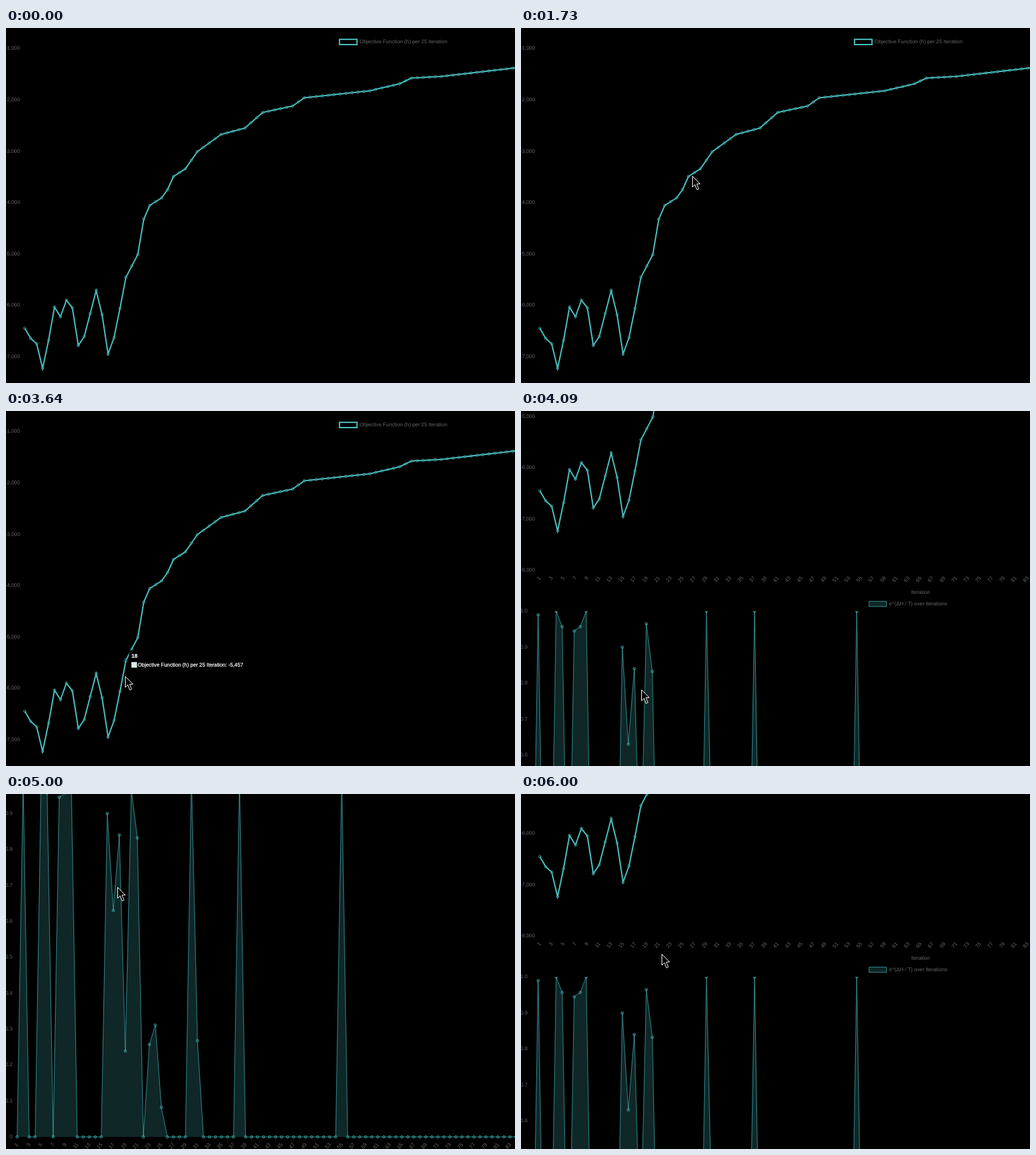
Animation, 800 px wide and 557 px high, one loop 6.09 s. Source, as an HTML page with a canvas:

```html
<!DOCTYPE html>
<html lang="en">
<head>
<meta charset="utf-8">
<title>Objective function charts</title>
<style>
  html, body { margin: 0; height: 100%; overflow: hidden; background: #000; }
  canvas { display: block; }
</style>
</head>
<body>
<canvas id="stage" width="800" height="557"></canvas>
<script>
const ctx = document.getElementById('stage').getContext('2d');
const LOOP = 6090, FRAMES = 67, COUNT = 84;
const U = 0.686;                    // page zoom: one chart unit in stage pixels
const FONT = 12 * U + 'px "Liberation Sans", Arial, sans-serif';
const TEAL = 'rgb(75,192,192)', GREY = '#666';

const clamp = v => Math.max(0, Math.min(1, v));
const range = (n, fn) => Array.from({length: n}, (_, i) => fn(i));

// Linear interpolation over keys of the form [position, ...values]
function at(keys, pos) {
  const next = keys.findIndex(k => k[0] > pos);
  if (next === 0) return keys[0].slice(1);
  if (next < 0) return keys[keys.length - 1].slice(1);
  const a = keys[next - 1], b = keys[next], p = (pos - a[0]) / (b[0] - a[0]);
  return a.slice(1).map((v, i) => v + (b[i + 1] - v) * p);
}

// Objective curve in page pixels: an erratic start, then a climb through a few knees
const erratic = [471, 487, 495.5, 534, 490, 438, 453, 427, 439, 498, 484, 448, 412, 450, 511.5, 486, 440];
const climb = [
  [18, 391.23], [20, 355.5], [21, 300], [22, 278.5], [24, 266.5], [25, 253.5],
  [26, 233], [28, 220.93], [30, 194], [34, 167], [38, 157], [41, 132.5],
  [46, 122.5], [48, 109.5], [59, 98.5], [64, 87.5], [66, 78.5], [71, 76], [84, 62]];
const objectiveY = n => n <= erratic.length ? erratic[n - 1] : at(climb, n)[0];

// Acceptance is zero except for these runs, keyed by their first iteration
const runs = {
  2: [.99], 5: [1, .957], 8: [.945, .957, 1], 16: [.9, .63, .84, .239, .965, .832],
  23: [.257, .311, .082], 30: [1, .268], 38: [1], 55: [1]};
const acceptance = Array(COUNT + 1).fill(0);
for (const first in runs) runs[first].forEach((v, i) => acceptance[+first + i] = v);

const charts = [
  {
    label: 'Objective Function (h) per 25 Iteration',
    points: range(COUNT, i => [29.5 + 9.35 * i, objectiveY(i + 1)]),
    width: 3, fill: 'rgba(0,0,0,0.1)', top: 0, base: 596, filled: false,
    legend: [524.2, 21.9], tickRight: 22,
    ticks: range(8, k => [`-${k + 1},000`, 32.2 + 80.55 * k]),
    value: y => '-' + Math.round(1000 + (y - 32.2) / 0.08055).toLocaleString('en-US')
  },
  {
    label: 'e^(ΔH / T) over Iterations',
    points: range(COUNT, i => [17.5 + 9.447 * i, 1224 - 563.9 * acceptance[i + 1]]),
    width: 1, fill: 'rgba(75,192,192,0.2)', top: 659.7, base: 1224, filled: true,
    legend: [547, 648.8], tickRight: 10.4,
    ticks: range(11, k => [k ? (k / 10).toFixed(1) : '0', 1224 - 56.39 * k]),
    value: y => ((1224 - y) / 563.9).toFixed(2)
  }
];

// Turning points of the pointer and the page: [step, ...position]
const cursorKeys = [
  [2, 394, 500], [7, 171, 430], [10, 174, 442], [12, 175, 441], [16, 212, 320],
  [19, 269, 232], [20, 254, 253], [22, 200, 403], [23, 200, 403], [27, 281, 222],
  [29, 205, 382], [30, 181, 422], [38, 188, 393], [40, 187, 416], [45, 189, 437],
  [48, 190, 437], [53, 178, 77], [55, 175, 146], [57, 168, 181], [62, 174, 178],
  [66, 221, 251]];
const scrollKeys = [[41, 0], [45, 346], [47, 686], [62, 686], [66, 373]];

// Tooltips: chart, iteration, start and end of hover in ms
const hovers = [
  [0, 17, 1070, 1250], [0, 25, 1740, 1810], [0, 28, 2420, 2625],
  [0, 18, 3430, 3640], [1, 17, 5150, 5680]];

function text(str, x, y, align = 'left', color = GREY, weight = '') {
  ctx.font = weight + ' ' + FONT;
  ctx.textRendering = 'geometricPrecision';
  ctx.textAlign = align;
  ctx.textBaseline = 'middle';
  ctx.fillStyle = color;
  ctx.fillText(str, x, y);
}

// White text on black gets a hairline so that it stays as dense as zoomed-out text
function brightText(str, x, y, weight) {
  text(str, x, y, 'left', '#fff', weight);
  ctx.strokeStyle = '#fff';
  ctx.lineWidth = 0.25;
  ctx.strokeText(str, x, y);
}

function trace(points) {
  ctx.beginPath();
  points.forEach(([x, y]) => ctx.lineTo(x, y));
}

function dot([x, y], radius, fill) {
  ctx.beginPath();
  ctx.arc(x, y, radius * U, 0, 7);
  ctx.fillStyle = fill;
  ctx.fill();
  ctx.lineWidth = U;
  ctx.stroke();
}

function drawChart(chart, hovered) {
  const {points, base} = chart, [lx, ly] = chart.legend;
  ctx.strokeStyle = TEAL;
  ctx.fillStyle = chart.fill;
  ctx.lineWidth = chart.width * U;
  ctx.fillRect(lx, ly - 6 * U, 40 * U, 12 * U);
  ctx.strokeRect(lx, ly - 6 * U, 40 * U, 12 * U);
  text(chart.label, lx + 46 * U, ly - 0.4);

  chart.ticks.forEach(([label, y]) => text(label, chart.tickRight, y, 'right'));
  for (let i = 0; i < COUNT; i += 2) {
    ctx.save();
    ctx.translate(points[i][0] + 0.5, base + 10.8);
    ctx.rotate(-50 * Math.PI / 180);
    text(i + 1, 0, 0, 'right');
    ctx.restore();
  }

  ctx.save();
  ctx.beginPath();
  ctx.rect(0, chart.top, 800, 1300);
  ctx.clip();
  if (chart.filled) {
    trace([[points[0][0], base], ...points, [points[COUNT - 1][0], base]]);
    ctx.fillStyle = chart.fill;
    ctx.fill();
  }
  trace(points);
  ctx.lineWidth = chart.width * U;
  ctx.stroke();
  points.forEach((p, i) => dot(p, 3 + (hovered[i + 1] || 0), chart.fill));
  ctx.restore();
}

function drawTooltip(chart, iteration, alpha) {
  const [px, py] = chart.points[iteration - 1];
  const body = `${chart.label}: ${chart.value(py)}`;
  const height = 46.8 * U, left = px + 7 * U, top = py - height / 2;
  const x = left + 6 * U, bodyY = top + 33.6 * U, box = 12 * U;
  ctx.save();
  ctx.globalAlpha = alpha;
  ctx.font = FONT;
  ctx.fillStyle = 'rgba(0,0,0,0.8)';
  ctx.beginPath();
  ctx.roundRect(left, top, ctx.measureText(body).width + 26 * U, height, 6 * U);
  ctx.moveTo(left, py - 5 * U);
  ctx.lineTo(px + 2 * U, py);
  ctx.lineTo(left, py + 5 * U);
  ctx.fill();
  ctx.strokeStyle = TEAL;
  ctx.lineWidth = U;
  ctx.strokeRect(x, bodyY - box / 2, box, box);
  ctx.fillStyle = '#fff';
  ctx.fillRect(x, bodyY - box / 2, box, box);
  ctx.fillStyle = chart.fill;
  ctx.fillRect(x + U, bodyY - box / 2 + U, box - 2 * U, box - 2 * U);
  brightText(iteration, x, top + 13.2 * U, 'bold');
  brightText(body, x + 14 * U, bodyY, '');
  ctx.restore();
}

function drawCursor([x, y]) {
  ctx.save();
  ctx.translate(Math.round(x) + 0.5, Math.round(y) + 0.5);
  trace([[0, 0], [0, 17], [4, 13.3], [7, 21.3], [10, 20], [6.8, 12.3], [12, 12.1]]);
  ctx.closePath();
  ctx.fillStyle = '#000';
  ctx.fill();
  ctx.strokeStyle = '#fff';
  ctx.lineWidth = 1;
  ctx.stroke();
  ctx.restore();
}

function draw(ms) {
  // The picture advances in steps of about 91 ms
  const step = Math.floor(ms / LOOP * FRAMES + 0.1) % FRAMES;
  const t = step * LOOP / FRAMES;
  const active = hovers
    .map(([c, i, on, off]) => [c, i, Math.min(clamp((t - on) / 200), clamp(1 - (t - off) / 200))])
    .filter(h => h[2] > 0);

  ctx.fillStyle = '#000';
  ctx.fillRect(0, 0, 800, 557);
  ctx.save();
  ctx.translate(0, -Math.round(at(scrollKeys, step)[0]));
  charts.forEach((chart, c) => {
    const hovered = {};
    active.forEach(h => { if (h[0] === c) hovered[h[1]] = h[2]; });
    drawChart(chart, hovered);
  });
  text('Iteration', 628, 630.5, 'center');
  active.forEach(([c, i, alpha]) => drawTooltip(charts[c], i, alpha));
  ctx.restore();
  if (step > 0) drawCursor(at(cursorKeys, step));
}

const start = performance.now();
function tick() {
  draw((performance.now() - start) % LOOP);
  requestAnimationFrame(tick);
}
tick();
</script>
</body>
</html>
```
